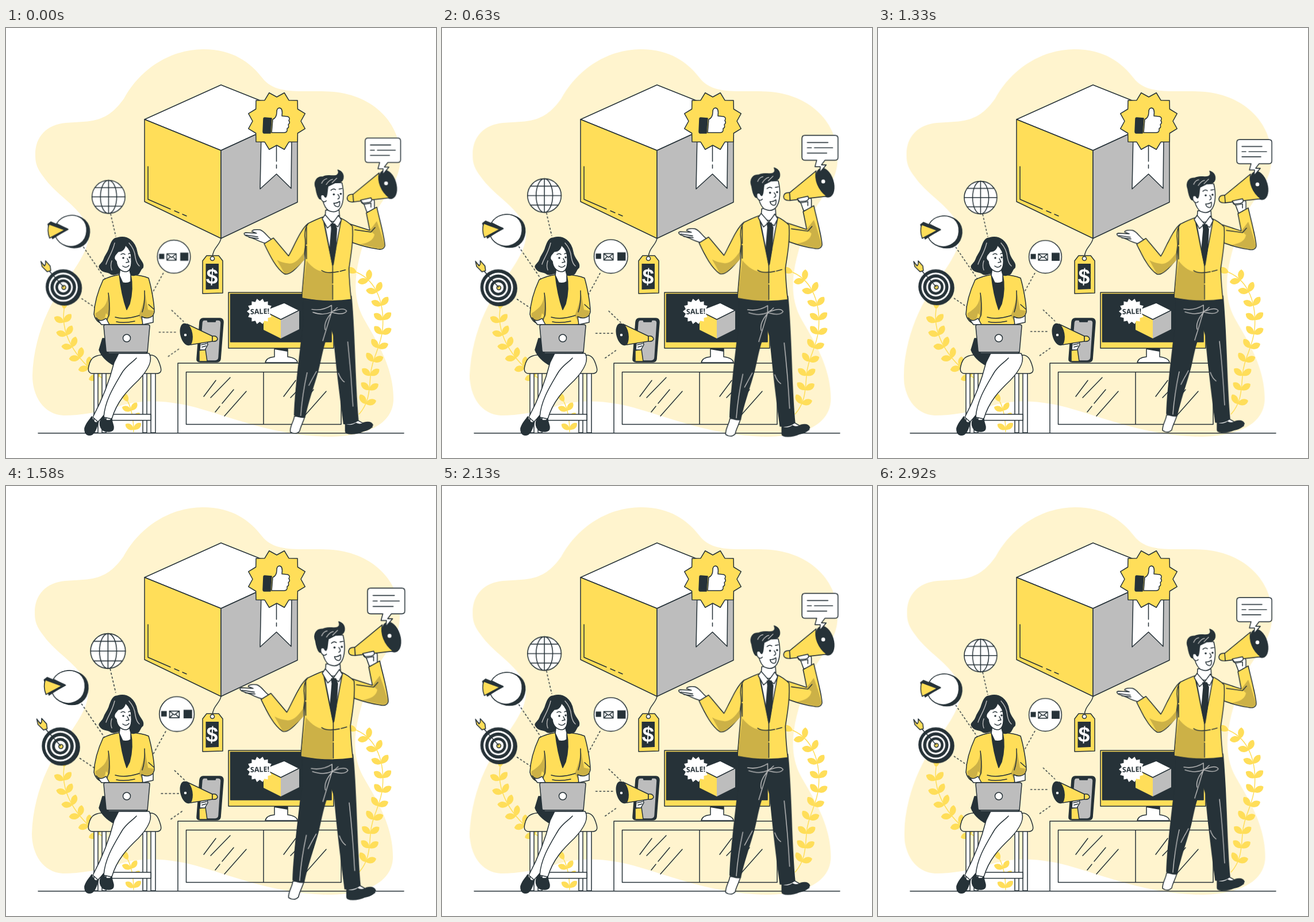
Write an HTML page that moves like this. It is 748x748 px and loops after 2960 ms.

```html
<!DOCTYPE html>
<html lang="en">
<head>
<meta charset="utf-8">
<title>Product launch</title>
<style>
html, body { margin: 0; width: 100%; height: 100%; overflow: hidden; background: #fff; }
svg { display: block; width: 100%; height: 100%; }
.s { stroke: #263238; stroke-width: 1.5; stroke-linecap: round; stroke-linejoin: round; }
.n { fill: none; }
.w { fill: #fff; }
.y { fill: #ffde59; }
.d { fill: #263238; }
.g { fill: #bdbdbd; }
.k { fill: #ccb147; }
.seam { fill: none; stroke: #bdbdbd; stroke-width: 1.4; stroke-linecap: round; }
.dot { fill: none; stroke: #263238; stroke-width: 1.4; stroke-dasharray: 3.5 3; }
.stem { fill: none; stroke: #ffde59; stroke-width: 1.5; }
text { font-family: "Liberation Sans", Arial, sans-serif; font-weight: 700; text-anchor: middle; }
.narrow { font-family: "Noto Sans", "Open Sans", sans-serif; font-stretch: extra-condensed; }
#blob { animation: shake 2.96s linear infinite; }
#icons, #man { animation: beat 2.96s linear infinite; }
#icons { transform-origin: 195px 418px; }
#man { transform-origin: 548px 450px; }
@keyframes beat {
  0% { transform: scale(1.01); }
  4.56%, 24.83%, 55.24%, 75.51% { transform: scale(1.1); }
  15.2%, 19.93%, 29.63%, 50.17%, 65.88%, 70.61%, 80.3%, 100% { transform: scale(1); }
}
@keyframes shake {
  0%, 50.17%, 100% { transform: translateX(0); }
  4.56%, 45.1%, 55.24%, 95.78% { transform: translateX(-1.5px); }
  9.63%, 40.03%, 60.3%, 90.71% { transform: translateX(3px); }
  14.7%, 24.83%, 34.97%, 65.37%, 75.51%, 85.64% { transform: translateX(-6px); }
  19.76%, 29.9%, 70.44%, 80.57% { transform: translateX(6px); }
}
</style>
</head>
<body>
<svg viewBox="0 0 748 748">
<path id="blob" fill="#fff4ce" d="M51 222C50 190 70 168 104 165C150 162 175 165 205 123C235 68 290 37 343 37C395 37 425 60 446 87C470 119 520 107 570 111C640 118 686 165 686 225C686 275 650 295 632 345C608 410 598 460 622 505C645 545 674 590 674 645C674 690 625 711 560 711C470 709 400 680 340 663C290 648 240 645 200 657C165 668 130 674 100 674C65 672 46 640 46 605C47 550 68 492 98 450C130 405 147 380 143 352C136 315 90 294 66 260C54 245 51 235 51 222Z"/>
<g id="plants"></g>

<g id="box" class="s">
  <path class="w" d="M374 99L507 152L374 213L241 159Z"/>
  <path class="y" d="M241 159L374 213V366L241 302Z"/>
  <path class="g" d="M507 152L374 213V366L507 303Z"/>
  <path class="n" d="M247 241V298L286 315M293 318L301 321.500M307 324L314 327"/>
  <path class="w" d="M444 185L442 280L470.500 254L496 279L497 185Z"/>
  <path class="n" d="M470.500 205V232M470.500 238V244"/>
  <path id="badge" class="y"/>
  <path class="d" d="M450 156L462 157L460 183L449 183Q447 183 447 180L448 158Q448 156 450 156Z"/>
  <path class="w" d="M464 159Q471 156 471 146Q471 139 476 139Q482 140 480 153L490 154Q495 156 492 161Q495 165 491 168Q493 173 489 175Q490 182 484 182L462 182Z"/>
  <path class="n" d="M374 366C372 378 360 382 359 399"/>
  <path class="y" d="M349 396H370L377 405V461L342 462V405Z"/>
  <circle class="w" cx="359" cy="401" r="3.500"/>
  <path class="d" stroke="none" d="M347.500 410H370V454L347.500 455Z"/>
</g>
<text x="358.500" y="445" font-size="37" fill="#fff" transform="rotate(4 358 432)">$</text>

<g id="cabinet" class="s n">
  <path d="M299 704V583H598V704M313.500 598.500H583V689.500H313.500ZM448 598.500V689.500"/>
  <path id="hatch" d="M344 641L365 613M356 643L390 608M364 668L372 658M376 653L396 629M380 675L418 632"/>
  <use href="#hatch" x="139"/>
</g>

<g id="screen">
  <path class="s y" d="M387 460H570V557H387Z"/>
  <path class="s d" d="M390.500 463H566V546H390.500Z"/>
  <path class="s w" d="M467 558H490V572Q506 574 507 582H451Q453 573 467 572Z"/>
  <path class="d" d="M467 557H490V563L467 559Z"/>
  <path class="y" d="M448 492L478 507V540L448 525Z"/>
  <path class="g" d="M510 491L478 507V540L510 524Z"/>
  <path class="s w" d="M484 478L510 491L478 507L448 492Z"/>
  <path id="sale" class="w"/>
  <text x="441.500" y="497.500" font-size="12.500" class="d narrow" transform="rotate(-2 441 493)">SALE!</text>
</g>
<path class="s" d="M56 704.800H692"/>

<g id="icons">
  <path class="dot" d="M182 324L191 363M135 381L174 438M132 470L162 490M273 426L252 464"/>
  <path class="dot" stroke-linecap="butt" d="M287 490L308 510M265 528H296M281 570L301 556"/>
  <g class="s">
    <circle class="w" cx="178.500" cy="295" r="28.500"/>
    <ellipse class="n" cx="178.500" cy="295" rx="14" ry="28.500"/>
    <path class="n" d="M178.500 266.500V323.500M150 295H207M155 279H202M155 311H202"/>
    <path class="d" d="M93 336C105 323 132 325 142 340C150 353 146 374 130 381C114 386 95 379 90 364Z"/>
    <path class="w" d="M89 341C97 327 118 322 132 332C145 343 143 366 130 375C114 386 94 379 87 363L109 351Z"/>
    <path class="d" d="M74 342L79 338L108 350L82 367Z"/>
    <path class="y" d="M76 342Q72 353 77 366L103 352Z"/>
    <circle class="d" cx="102.500" cy="452" r="29.500"/>
    <circle class="d" cx="100.500" cy="450" r="29.500"/>
    <g stroke="none">
      <circle class="w" cx="100.500" cy="450.500" r="25"/>
      <circle class="d" cx="100.500" cy="450.500" r="22"/>
      <circle class="w" cx="100.500" cy="450.500" r="16.500"/>
      <circle class="d" cx="100.500" cy="450.500" r="13.500"/>
      <circle class="w" cx="100.500" cy="450.500" r="9"/>
    </g>
    <circle class="y" cx="101.500" cy="451" r="3.500"/>
    <path class="n" d="M66 411L101 450"/>
    <path class="y" d="M68 414L62 406L64 415L73 424L79 422L78 414L70 405L70 411Z"/>
    <circle class="w" cx="291" cy="398" r="28.500"/>
    <path class="w" d="M279 393H295V404H279ZL287 399.500L295 393M279 404L285 398M295 404L289 398"/>
  </g>
  <rect class="d" x="265.500" y="393" width="9" height="9"/>
  <rect class="d" x="302" y="391" width="14" height="14"/>
</g>

<g id="phone" class="s">
  <path class="d" d="M343 505H372Q378 505 378 512L373 576Q372 581 366 581H338Q331 581 332 575L337 511Q338 505 343 505Z"/>
  <path class="g" d="M345 508L350 508L351 511H364L365 508H369Q374 508 374 513L370 574Q369 579 364 579H341Q336 579 336 574L341 512Q342 508 345 508Z"/>
  <path class="y" d="M336 561L347 559L350 580H336Z"/>
  <path class="w" d="M337 560L338 548L350 545L351 551L346 560Z"/>
  <path class="n" d="M340 551L349 549M341 555L348 553"/>
  <ellipse class="d" cx="314" cy="533" rx="10" ry="19" transform="rotate(-14 314 533)"/>
  <path class="y" d="M315 515C324 522 327 540 321 551L359 545V536Z"/>
  <path class="y" d="M359 536Q367 535 368 541Q367 546 359 545Z"/>
  <circle class="w" cx="312" cy="534" r="3"/>
</g>

<g id="woman" class="s">
  <path class="w" d="M153 599V704H160V599M167 599V704H174V599M238 599V704H245V599M252 599V704H260V599"/>
  <path class="w" d="M174 672H252V682.500H174Z"/>
  <path fill="#fff4ce" d="M154 572Q163 567 180 569H250C260 568 265 575 269 590Q272 601 262 601H150Q141 600 144 588Q147 575 154 572Z"/>
  <path class="d" d="M168 540L162 560Q168 576 188 587Q205 585 225 565L240 540Z"/>
  <path class="w" d="M188 582C184 598 174 634 151 677L160 685C178 668 198 636 221 597L237 566H196Z"/>
  <path class="w" d="M214 566H249C256 578 248 594 230 613C212 630 193 649 184 680L170 677C172 648 188 623 201 601C209 587 220 582 227 574"/>
  <path class="d" d="M149 676C145 683 140 686 137 696C136 708 144 710 150 707C157 702 158 692 161 685Q153 690 149 676Z"/>
  <path class="d" d="M169 675C161 684 162 694 169 700C178 704 187 702 187 696C188 691 184 688 184 679Q177 690 169 675Z"/>
  <path class="y" d="M169 438Q180 432 197 429L210 454L216 429Q237 430 248 435C253 452 258 479 258 494Q253 511 235 516H178Q157 516 153 498C154 475 162 453 169 438Z"/>
  <path class="k" stroke="none" d="M177 464C177 482 168 488 155 497Q157 509 169 515L174 496L180 503Q184 489 177 464ZM242 462C240 474 236 488 231 500L238 513Q255 509 257 492L247 490Z"/>
  <path class="n" d="M178 461Q181 478 179 499L173 515M241 457Q242 480 237 494M190 503Q207 508 232 500M192 511Q205 514 224 510M248 481L257 489"/>
  <path class="w" d="M157 504Q163 513 174 505L180 516H166ZM236 502Q247 508 256 500L256 512L238 516Z"/>
  <path class="d" d="M197 429L217 429Q222 454 215 480L210 490Q201 465 197 429Z"/>
  <path class="d" d="M194 365C185 365 182 376 179 385C176 393 173 394 170 403C168 410 158 413 164 419C168 426 176 423 181 427C188 433 196 423 204 428C212 425 220 434 226 429C233 430 232 421 238 417C241 407 230 403 228 390C225 372 212 360 194 365Z"/>
  <path class="w" d="M199 416L197 430L203 443Q211 445 217 441V429L214 418Z"/>
  <path class="w" d="M195 389C205 389 208 380 207 377C214 383 219 390 218 402C219 414 216 423 209 424C199 424 193 416 192 406Q186 401 190 395Z"/>
  <path class="seam" d="M189 374C185 391 178 399 174 411M184 405Q181 414 184 421M214 374Q224 385 225 399Q227 410 232 414"/>
  <path class="n" d="M200 394Q204 391 207 394M213 393Q216 391 218 393M211 401L214 407L209 408M203 414Q209 419 214 413"/>
  <circle class="d" stroke="none" cx="204" cy="400" r="1.700"/><circle class="d" stroke="none" cx="215" cy="399" r="1.700"/>
  <path class="g" d="M173 516H247Q250 516 250 519L246 564H177Q174 564 174 561L170 519Q170 516 173 516Z"/>
  <path class="g" d="M176 564H246L244 566H179Z"/>
  <circle class="w" cx="210" cy="539.500" r="6.500"/>
</g>

<g id="man" class="s">
  <path class="w" d="M502 673C501 683 494 690 495 700Q504 706 511 699C513 690 517 684 520 674Z"/>
  <path class="w" d="M590 682L591 696L636 692Q630 686 620 685L611 680Z"/>
  <path class="d" d="M590 687Q600 691 608 685Q616 689 622 684Q634 681 637 688Q635 696 620 699C607 705 590 705 590 699Z"/>
  <path class="d" d="M518 466H600C606 520 606 620 612 680Q602 688 587 686C582 646 574 590 570 535L565 520C552 545 549 570 543 594C536 620 526 645 520 675Q510 676 502 671C503 630 510 580 515 535C518 510 517 490 518 466Z"/>
  <path class="seam" d="M532 489Q551 492 566 482L566 494L551 543M534 494Q560 503 576 486M567 494Q587 500 592 492Q588 485 570 492M555 524Q552 510 567 494M524 598C518 625 515 645 513 672M540 596Q532 610 527 620M594 545Q600 600 603 656M578 599Q582 610 588 614"/>
  <path class="w" d="M466 371C456 366 452 355 443 352C436 351 429 352 429 355L437 358L418 357Q413 358 418 362L434 368Q443 373 455 376Z"/>
  <path class="n" d="M419 361L439 364M424 365L440 367"/>
  <path class="y" d="M526 341C513 350 500 384 492 397L466 366L450 376C460 397 471 419 485 428Q496 432 518 403Z"/>
  <path class="k" stroke="none" d="M519 390Q505 412 492 410Q481 409 472 404L485 427Q495 430 519 404Z"/>
  <path class="w" d="M625 296C616 299 615 305 622 308L627 322L640 318V304Q640 297 630 297Z"/>
  <path class="y" d="M598 342L632 353L626 323L644 313C649 336 656 358 658 379Q656 388 644 385C630 383 616 379 602 374Z"/>
  <path class="k" stroke="none" d="M632 353L644 337Q653 361 657 379Q655 386 645 384L615 377Q638 374 640 360Z"/>
  <path class="n" d="M606 352L634 356L641 348"/>
  <path class="y" d="M526 341Q540 334 551 330L568 414L580 331Q594 337 602 346C604 368 600 392 596 419Q597 448 600 472Q560 478 515 469C517 430 524 389 520 362Q520 348 526 341Z"/>
  <path class="k" stroke="none" d="M523 405Q542 430 568 424L567 474Q540 474 516 469C517 444 521 425 523 405Z"/>
  <path class="n" d="M568 414V472M549 422Q560 430 590 421M523 347V402" stroke-dasharray="30 3"/>
  <path class="w" d="M552 331L568 413L583 333L577 328Q567 337 556 325Z"/>
  <path class="w" d="M556 318L555 330Q569 346 580 329L579 318Z"/>
  <path class="w" d="M555 326L550 333L559 349L568 341L577 347L583 335L578 327L568 341Z"/>
  <path class="d" d="M565 342H572L575 350L573 387L569 412L563 387L566 350Z"/>
  <path class="w" d="M549 278C547 292 552 313 561 319Q575 325 582 313C587 304 588 288 584 271L560 270Z"/>
  <path class="d" d="M539 280C535 270 540 260 551 261C560 256 568 261 575 258Q580 255 577 249Q588 253 586 264Q584 272 572 271L560 277C558 286 559 294 556 296L551 293C548 305 542 299 539 280Z"/>
  <path class="w" d="M552 292Q546 290 548 299Q552 307 557 302"/>
  <path class="seam" d="M549 272Q552 265 558 264M557 274Q562 266 568 265M567 271L575 263"/>
  <path class="n" d="M565 284Q569 280 573 283M579 282L584 281M577 291Q582 297 577 299"/>
  <circle class="d" stroke="none" cx="570" cy="291" r="1.700"/><circle class="d" stroke="none" cx="582" cy="290" r="1.700"/>
  <path class="w" d="M570 306Q575 307 580 303Q581 314 575 312Q571 311 570 306Z"/>
  <path class="y" d="M604 291Q594 290 593 297Q593 305 604 304Z"/>
  <ellipse class="d" cx="663" cy="274" rx="14" ry="25" transform="rotate(-17 663 274)"/>
  <path class="y" d="M603 291L648 254C645 268 651 286 666 297L604 304Z"/>
  <circle class="w" cx="660" cy="272" r="4"/>
  <path class="w" d="M616 301L634 297Q638 303 630 305L620 306Z"/>
  <path class="n" d="M622 308L634 306V313"/>
  <path class="w" d="M629 194H680Q685 194 685 199V231Q685 236 680 236H663L657 244H665L654 257L655 247H646L649 236H629Q624 236 624 231V199Q624 194 629 194Z"/>
  <path class="n" d="M633 206H668M633 215H640M645 215H676M633 224H666"/>
</g>
</svg>
<script>
const svgNS = "http://www.w3.org/2000/svg";
const byId = id => document.getElementById(id);

function add(parent, attrs) {
  const path = document.createElementNS(svgNS, "path");
  for (const key in attrs) path.setAttribute(key, attrs[key]);
  return parent.appendChild(path);
}

function star(x, y, tips, outer, inner) {
  const points = Array.from({ length: tips * 2 }, (_, i) => {
    const a = (i + 1) * Math.PI / tips - Math.PI / 2;
    const r = i % 2 ? inner : outer;
    return [x + r * Math.cos(a), y + r * Math.sin(a)];
  });
  return "M" + points.join("L") + "Z";
}

// Leaves sit in pairs along a stem drawn from root to tip.
function plant(d, pairs, size) {
  const stem = add(byId("plants"), { d, class: "stem" });
  const total = stem.getTotalLength();
  for (let i = 0; i <= pairs; i++) {
    const at = total * (0.08 + 0.92 * i / pairs);
    const p = stem.getPointAtLength(at);
    const q = stem.getPointAtLength(at - 2);
    const angle = Math.atan2(p.y - q.y, p.x - q.x) * 180 / Math.PI;
    for (const turn of i < pairs ? [-52, 52] : [0]) {
      add(byId("plants"), {
        class: "y",
        d: "M0 0C5-8 16-8 20-1C16 7 6 7 0 0Z",
        transform: `translate(${p.x} ${p.y}) rotate(${angle + turn}) scale(${size})`
      });
    }
  }
}

byId("badge").setAttribute("d", star(471, 162, 12, 51, 42));
byId("sale").setAttribute("d", star(441.5, 493, 14, 22.5, 18));
plant("M172 612C130 585 94 540 101 489", 6, 0.95);
plant("M614 672C632 652 632 630 634 605C636 575 652 555 655 525C659 480 645 440 610 425", 10, 0.95);
plant("M222 703C222 680 219 664 212 650", 3, 0.85);
</script>
</body>
</html>
```
